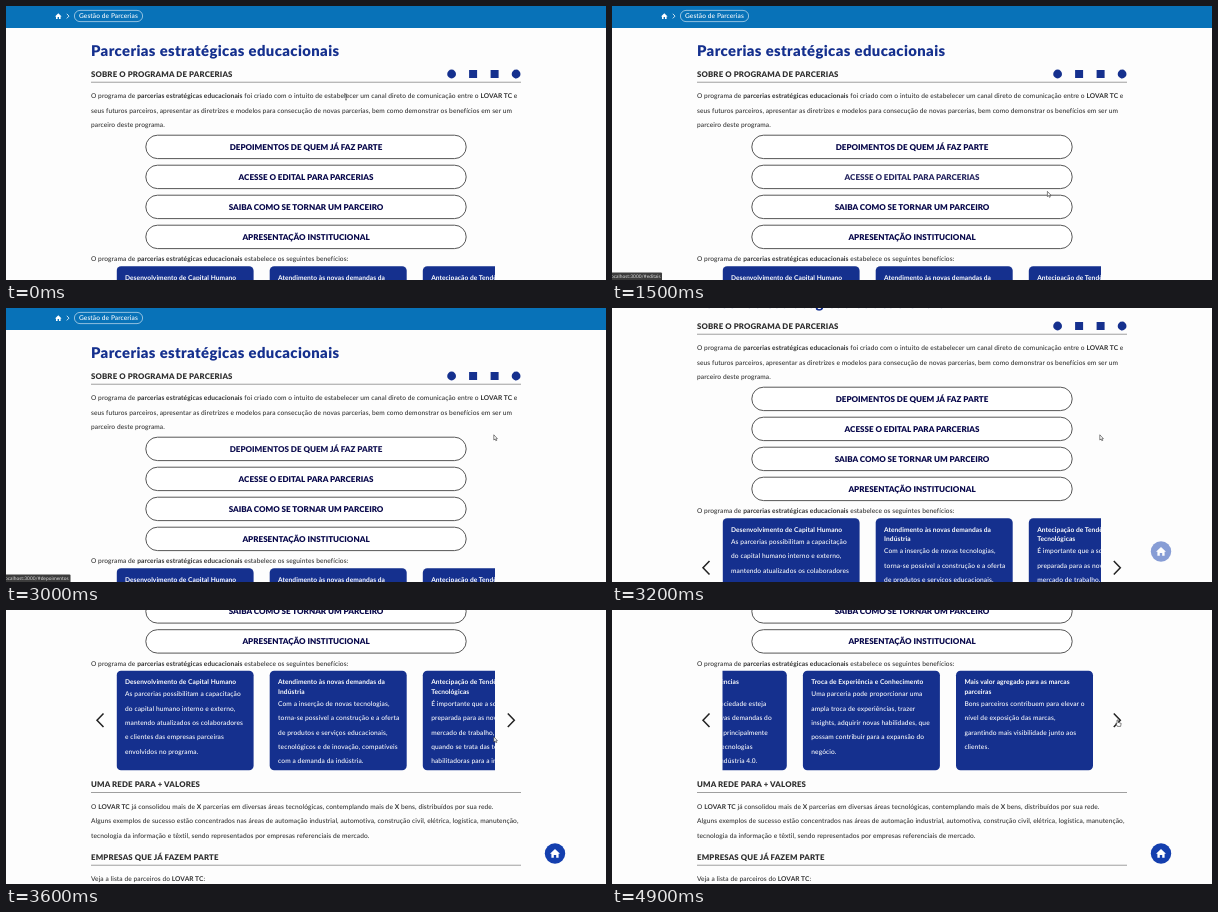
Recreate the animation shown at these times as an HTML page. Size 600 px wide and 274 px high, loop 5000 ms.

```html
<!DOCTYPE html>
<html lang="pt-BR">
<head>
<meta charset="utf-8">
<title>Gestão de Parcerias</title>
<style>
html, body { margin: 0; width: 100%; height: 100%; overflow: hidden; background: #fdfdfd; }
svg { display: block; width: 600px; height: 274px; }
text { font-family: Lato, "Open Sans", sans-serif; text-rendering: geometricPrecision; white-space: pre; }
</style>
</head>
<body>
<svg id="stage" viewBox="0 0 600 274"></svg>
<script>
const NS = 'http://www.w3.org/2000/svg';
const LOOP = 5000, STEP = 100;
const NAVY = '#15308e', INK = '#303030', DEEP = '#07074a';
const stage = document.getElementById('stage');

function add(parent, tag, attrs = {}) {
  const el = document.createElementNS(NS, tag);
  for (const k in attrs) el.setAttribute(k, attrs[k]);
  return parent.appendChild(el);
}

// Parts between asterisks are set bold.
function text(parent, x, y, str, style, more = {}) {
  const el = add(parent, 'text', { x, y, ...style, ...more });
  str.split('*').forEach((part, i) => {
    const span = add(el, 'tspan', i % 2 ? { 'font-weight': 700 } : {});
    span.textContent = part;
  });
  return el;
}

const BODY = { 'font-size': 6.6, 'font-weight': 500, 'letter-spacing': 0.08, fill: INK };
const HEAD = { 'font-size': 7.8, 'font-weight': 900, 'letter-spacing': 0.16, fill: INK };
const CARD = { ...BODY, 'letter-spacing': 0.1, fill: '#fff' };
const CARD_HEAD = { 'font-size': 6.6, 'font-weight': 700, 'letter-spacing': 0.06, fill: '#fff' };
const LEAD = 14.35;

const page = add(stage, 'g');

function lines(x, y, rows, style, parent = page) {
  rows.forEach((row, i) => text(parent, x, y + i * LEAD, row, style));
}

function section(y, title) {
  text(page, 85, y, title, HEAD);
  add(page, 'rect', { x: 85, y: y + 5, width: 430, height: 0.7, fill: '#777' });
}

// Top bar
add(page, 'rect', { width: 600, height: 22, fill: '#0872b8' });
add(page, 'path', { d: 'M49 10.4L52.3 7.2L55.6 10.4H54.6V13H53V11H51.6V13H50V10.4Z', fill: '#fff' });
add(page, 'path', { d: 'M60.8 7.8L63 10.1L60.8 12.4', fill: 'none', stroke: '#fff', 'stroke-width': 0.8 });
add(page, 'rect', { x: 68.4, y: 4.4, width: 68.2, height: 11.2, rx: 5.6, fill: 'none', stroke: '#fff', 'stroke-width': 0.55 });
text(page, 73, 12.4, 'Gestão de Parcerias', { ...BODY, fill: '#fff' });

// Introduction
text(page, 85, 49.6, 'Parcerias estratégicas educacionais',
  { 'font-size': 14.8, 'font-weight': 900, 'letter-spacing': 0.4, fill: NAVY });
section(70.8, 'SOBRE O PROGRAMA DE PARCERIAS');
[445.6, 467.1, 488.6, 510.1].forEach((x, i) => {
  if (i % 3) add(page, 'rect', { x: x - 4, y: 64, width: 8, height: 8, fill: NAVY });
  else add(page, 'circle', { cx: x, cy: 68, r: 4.4, fill: NAVY });
});
lines(85, 92.2, [
  'O programa de *parcerias estratégicas educacionais* foi criado com o intuito de estabelecer um canal direto de comunicação entre o *LOVAR TC* e',
  'seus futuros parceiros, apresentar as diretrizes e modelos para consecução de novas parcerias, bem como demonstrar os benefícios em ser um',
  'parceiro deste programa.'
], BODY);

const labels = [
  'DEPOIMENTOS DE QUEM JÁ FAZ PARTE',
  'ACESSE O EDITAL PARA PARCERIAS',
  'SAIBA COMO SE TORNAR UM PARCEIRO',
  'APRESENTAÇÃO INSTITUCIONAL'
].map((label, i) => {
  const y = 129.2 + i * 30;
  add(page, 'rect', { x: 139.8, y, width: 320.4, height: 23.4, rx: 11.7, fill: '#fff', stroke: '#444', 'stroke-width': 0.9 });
  return text(page, 300, y + 14.4, label, { 'font-size': 8.06, 'font-weight': 900, fill: DEEP, 'text-anchor': 'middle' });
});

// Benefits carousel
text(page, 85, 255.4, 'O programa de *parcerias estratégicas educacionais* estabelece os seguintes benefícios:', BODY);
const clip = add(add(stage, 'defs'), 'clipPath', { id: 'window' });
add(clip, 'rect', { x: 110.5, y: 255, width: 378.5, height: 110 });
const track = add(add(page, 'g', { 'clip-path': 'url(#window)' }), 'g');
[
  [['Desenvolvimento de Capital Humano'],
   ['As parcerias possibilitam a capacitação', 'do capital humano interno e externo,', 'mantendo atualizados os colaboradores', 'e clientes das empresas parceiras', 'envolvidos no programa.']],
  [['Atendimento às novas demandas da', 'Indústria'],
   ['Com a inserção de novas tecnologias,', 'torna-se possível a construção e a oferta', 'de produtos e serviços educacionais,', 'tecnológicos e de inovação, compatíveis', 'com a demanda da indústria.']],
  [['Antecipação de Tendências', 'Tecnológicas'],
   ['É importante que a sociedade esteja', 'preparada para as novas demandas do', 'mercado de trabalho, principalmente', 'quando se trata das tecnologias', 'habilitadoras para a indústria 4.0.']],
  [['Troca de Experiência e Conhecimento'],
   ['Uma parceria pode proporcionar uma', 'ampla troca de experiências, trazer', 'insights, adquirir novas habilidades, que', 'possam contribuir para a expansão do', 'negócio.']],
  [['Mais valor agregado para as marcas', 'parceiras'],
   ['Bons parceiros contribuem para elevar o', 'nível de exposição das marcas,', 'garantindo mais visibilidade junto aos', 'clientes.']]
].forEach(([head, body], i) => {
  const x = 110.6 + i * 153.1;
  add(track, 'rect', { x, y: 260.3, width: 137, height: 99.5, rx: 4.5, fill: NAVY });
  head.forEach((row, n) => text(track, x + 8.4, 273.8 + n * 9.6, row, CARD_HEAD));
  lines(x + 8.4, 276.2 + head.length * 9.6, body, CARD, track);
});
for (const d of ['M97.5 303L91 309.8L97.5 316.6', 'M501.8 303L508.3 309.8L501.8 316.6'])
  add(page, 'path', { d, fill: 'none', stroke: '#222', 'stroke-width': 1.5 });

// Lower sections
section(376.8, 'UMA REDE PARA + VALORES');
lines(85, 398.4, [
  'O *LOVAR TC* já consolidou mais de *X* parcerias em diversas áreas tecnológicas, contemplando mais de *X* bens, distribuídos por sua rede.',
  'Alguns exemplos de sucesso estão concentrados nas áreas de automação industrial, automotiva, construção civil, elétrica, logística, manutenção,',
  'tecnologia da informação e têxtil, sendo representados por empresas referenciais de mercado.'
], BODY);
section(449.3, 'EMPRESAS QUE JÁ FAZEM PARTE');
text(page, 85, 470.8, 'Veja a lista de parceiros do *LOVAR TC*:', BODY);

// Back to top
const toTop = add(stage, 'g');
add(toTop, 'circle', { cx: 549, cy: 243.5, r: 10.2, fill: '#143fae' });
add(toTop, 'path', { d: 'M544 243.8L549 239L554 243.8H552.6V247.8H550.2V245H547.8V247.8H545.4V243.8Z', fill: '#fff' });

// Link preview
const status = add(stage, 'g');
const statusBox = add(status, 'rect', { x: -2, y: 266.6, height: 9, rx: 1, fill: '#3c3c3c' });
const statusText = text(status, -1, 272.4, '', { 'font-size': 4.85, 'letter-spacing': 0.02, fill: '#ddd' });

// Pointers
const pointer = add(stage, 'g');
const shapes = {
  beam: 'M-1 -2.8H1M0 -2.8V2.8M-1 2.8H1',
  arrow: 'M-.6 -.6V4.6L.6 3.6L1.5 5.4L2.3 5L1.5 3.3H3Z',
  hand: 'M0 0V3.6L-1.2 3.2L.4 6.4H3.6L4.2 3.4L1.2 2.4V0Z'
};
const cursors = Object.entries(shapes).map(([name, d]) => ({
  name, el: add(pointer, 'path', { d, fill: '#fff', stroke: '#333', 'stroke-width': 0.6, 'stroke-linejoin': 'round' })
}));

// Motion tables: time, then values
const path = [
  [0, 340, 91], [200, 344, 104], [500, 362, 140], [900, 400, 158], [1200, 422, 170],
  [1500, 436, 186], [1700, 438, 203], [1950, 434, 222], [2150, 425, 199], [2300, 417, 171],
  [2400, 412, 153.4], [2600, 430, 143], [2800, 464, 133], [3000, 488.4, 127.4],
  [3700, 488.4, 127.4], [4000, 499, 115], [4200, 505, 110]
];
const scroll = [[3000, 0], [3100, 14], [3200, 50], [3300, 94], [3400, 132], [3500, 174], [3600, 199.5]];
const links = [
  [400, 800, 0, 'depoimentos'], [900, 1400, 1, 'editais'], [1600, 1800, 2, 'parceiro'],
  [1900, 2000, 3, 'apresentacao'], [2100, 2200, 2, 'parceiro'], [2300, 2300, 1, 'editais'],
  [2500, 2800, 0, 'depoimentos']
];
const widths = { depoimentos: 66.5, editais: 52, parceiro: 57, apresentacao: 68 };

function at(table, t, col = 1) {
  const i = table.findIndex(row => row[0] > t);
  if (i === 0) return table[0][col];
  if (i < 0) return table[table.length - 1][col];
  const a = table[i - 1], b = table[i];
  return a[col] + (b[col] - a[col]) * (t - a[0]) / (b[0] - a[0]);
}

const clamp = v => Math.max(0, Math.min(1, v));
const ease = v => v * v * (3 - 2 * v);

function draw(t) {
  page.setAttribute('transform', `translate(0 ${-at(scroll, t)})`);
  track.setAttribute('transform', `translate(${-379 * ease(clamp((t - 4300) / 500))} 0)`);
  toTop.setAttribute('opacity', clamp((t - 3100) / 200));

  const fade = [0, 0, 0, 0];
  let link = null;
  for (const [start, end, i, name] of links) {
    if (t < start) continue;
    link = name;
    const glow = clamp((t - start + 100) / 200) * clamp(1 - (t - end) / 250);
    fade[i] = Math.max(fade[i], glow);
  }
  labels.forEach((el, i) => el.setAttribute('opacity', 1 - 0.2 * fade[i]));

  const shown = link && t < 3100;
  status.setAttribute('opacity', shown ? 1 : 0);
  if (shown) {
    statusText.textContent = 'ocalhost:3000/#' + link;
    statusBox.setAttribute('width', widths[link]);
  }

  const over = links.some(([a, b]) => t >= a && t <= b) || t >= 4100;
  const kind = over ? 'hand' : t < 300 ? 'beam' : 'arrow';
  cursors.forEach(c => c.el.setAttribute('opacity', c.name === kind ? 1 : 0));
  pointer.setAttribute('transform', `translate(${at(path, t)} ${at(path, t, 2)})`);
}

const origin = performance.now();
function tick() {
  const t = (performance.now() - origin) % LOOP;
  draw(Math.floor(t / STEP) * STEP);
  requestAnimationFrame(tick);
}
draw(0);
tick();
</script>
</body>
</html>
```
